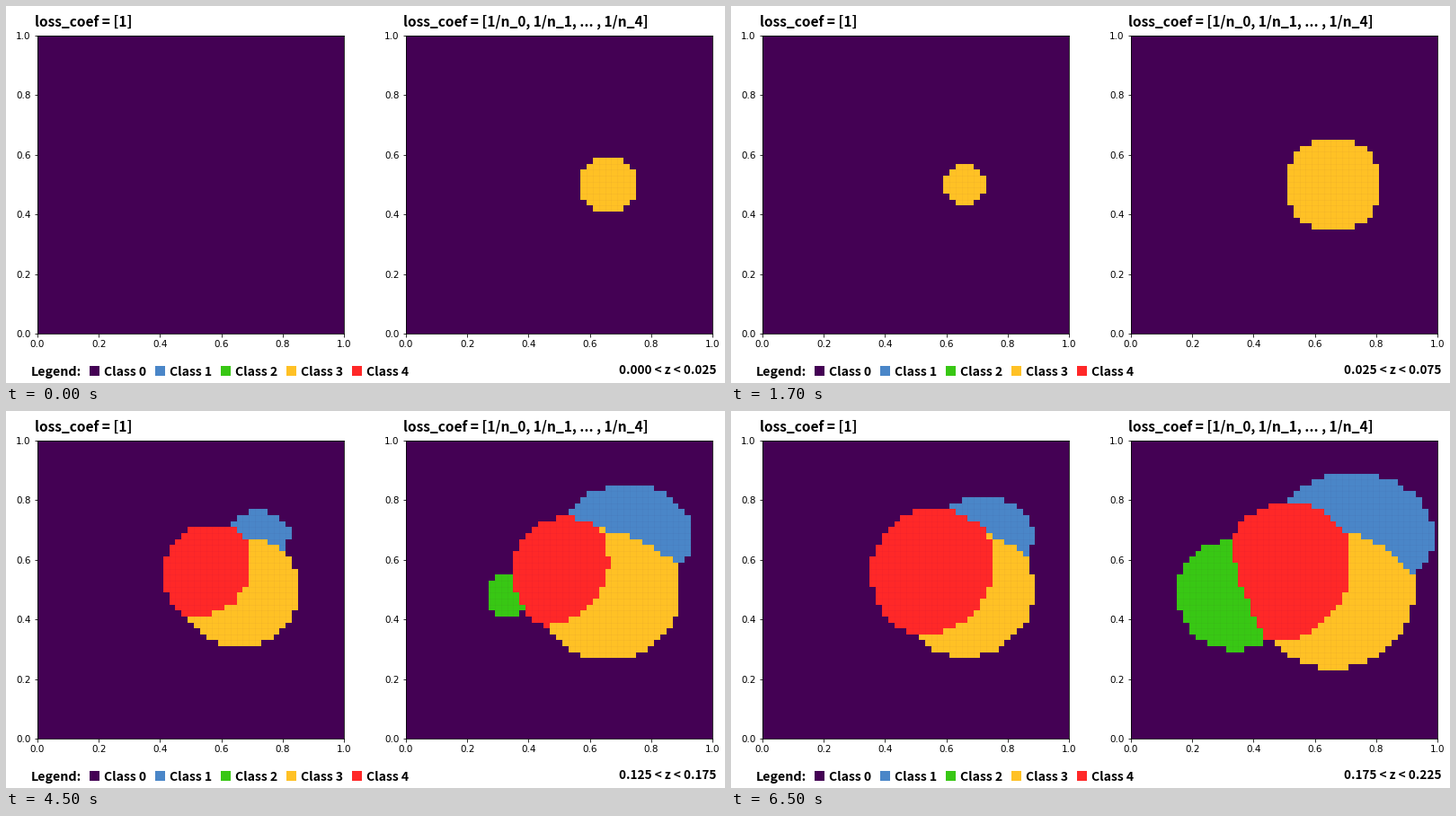
Write a matplotlib script that moves like this. It is 800 by 420 pixels and loops after 8 s.

```python
import matplotlib.pyplot as plt
import numpy as np
from matplotlib.animation import FuncAnimation
from matplotlib.colors import ListedColormap
from matplotlib.patches import Rectangle

W, H, DPI = 800, 420, 100
PX = 72 / DPI
CELLS = 51
SLICES = 5
COLORS = ["#440154", "#4a86c8", "#38c714", "#ffc125", "#ff2828"]
LABEL_FONT = ["Noto Sans CJK JP", "DejaVu Sans"]

col, row = np.meshgrid(np.arange(CELLS), np.arange(CELLS))


def bump(centre, radius, weight, aspect=1.0):
    """Weighted score that is positive inside an ellipse."""
    dx, dy = (col - centre[0]) / aspect, row - centre[1]
    return weight * (radius ** 2 - dx ** 2 - dy ** 2)


def classify(blue, green, yellow, red, red_x):
    """Class with the highest score in each cell; class 0 scores zero."""
    scores = [
        np.zeros((CELLS, CELLS)),
        bump((36.1, 34.2), blue, 0.3, aspect=1.28),
        bump((16.7, 24.1), green, 0.85),
        bump((33, 25), yellow, 0.42),
        bump((red_x, 27.7), red, 1),
    ]
    return np.argmax(scores, axis=0)


def slices(red_x, **radii):
    """Class maps for all slices; each class lists its radii once it appears."""
    padded = {name: (0,) * (SLICES - len(r)) + r for name, r in radii.items()}
    return [classify(red_x=red_x, **{name: r[k] for name, r in padded.items()})
            for k in range(SLICES)]


left_maps = slices(28.7, blue=(4, 6.3), green=(),
                   yellow=(3.4, 7.9, 9.5, 11.3), red=(5.2, 8.3, 11))
right_maps = slices(26.8, blue=(6.4, 8.4, 10.4), green=(3.6, 9.2),
                    yellow=(4.8, 8, 10.2, 12, 13.3), red=(7.6, 9.7, 12.2))

fig = plt.figure(figsize=(W / DPI, H / DPI), dpi=DPI, facecolor="white")


def write(x, y, text, size, **style):
    return fig.text(x / W, 1 - y / H, text, fontsize=size * PX,
                    family=LABEL_FONT, weight="bold", va="baseline", **style)


def add_plot(x, title):
    ax = fig.add_axes([x / W, 1 - 365 / H, 341 / W, 332 / H])
    image = ax.imshow(left_maps[0], cmap=ListedColormap(COLORS), vmin=0,
                      vmax=4, origin="lower", aspect="auto",
                      interpolation="nearest", extent=(-0.01, 1.01) * 2)
    seams = np.arange(0.01, 1, 0.02)
    style = dict(color=COLORS[0], alpha=0.05, lw=0.5 * PX)
    ax.vlines(seams, 0, 1, **style)
    ax.hlines(seams, 0, 1, **style)
    ticks = np.linspace(0, 1, 6)
    ax.set(xlim=(0, 1), ylim=(0, 1), xticks=ticks, yticks=ticks)
    ax.tick_params(labelsize=10.4 * PX, labelfontfamily="DejaVu Sans",
                   length=3.5 * PX, width=0.8 * PX, pad=4 * PX)
    for spine in ax.spines.values():
        spine.set_linewidth(0.8 * PX)
    write(x - 2.5, 23, title, 15.5)
    return image


left = add_plot(35, "loss_coef = [1]")
right = add_plot(445, "loss_coef = [1/n_0, 1/n_1, ... , 1/n_4]")

write(28, 412, "Legend:", 14.3)
for k, color in enumerate(COLORS):
    x = 93 + 73 * k
    fig.add_artist(Rectangle((x / W, 1 - 412 / H), 11 / W, 11 / H,
                             color=color, lw=0))
    write(x + 16, 412, f"Class {k}", 14)
z_label = write(790, 410.5, "", 13.6, ha="right")


def update(frame):
    k = (frame + 3) // 4
    left.set_data(left_maps[k])
    right.set_data(right_maps[k])
    low, high = max(0, 0.05 * k - 0.025), 0.05 * k + 0.025
    z_label.set_text(f"{low:.3f} < z < {high:.3f}")
    return left, right, z_label


anim = FuncAnimation(fig, update, frames=16, interval=500, repeat=True,
                     repeat_delay=0)
plt.show()
```
